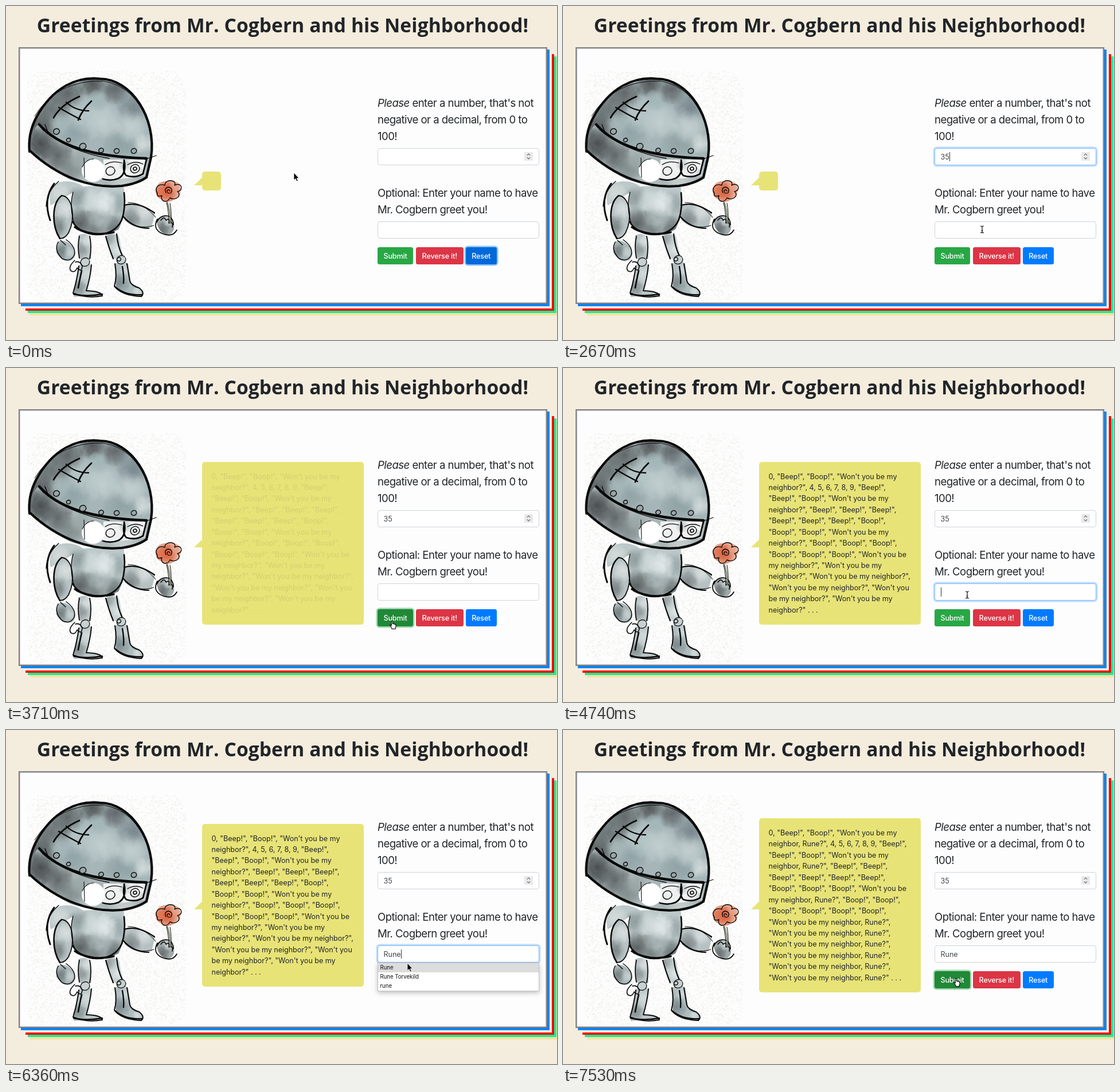
Recreate the animation shown at these times as an HTML page with a canvas. Size 961 by 583 pixels, loop 8000 ms.

```html
<!DOCTYPE html>
<html lang="en">
<head>
<meta charset="utf-8">
<title>Greetings</title>
<style>
html, body { margin: 0; width: 100%; height: 100%; overflow: hidden; background: #f4ecdd; }
#stage { position: relative; width: 961px; height: 583px; overflow: hidden; color: #212529;
  font: 12.6px/19.43px Inter, sans-serif; letter-spacing: -.04px; }
#stage > * { position: absolute; box-sizing: border-box; margin: 0; white-space: pre; }
canvas { left: 0; top: 0; width: 961px; height: 583px; }
h1 { left: 0; top: 13px; width: 965px; text-align: center; letter-spacing: .12px;
  font: 700 33.5px/40px "Open Sans", sans-serif; }
.label { left: 648px; font-size: 18.6px; line-height: 29.1px; letter-spacing: -.55px; }
.field { left: 648px; width: 281.5px; height: 30.5px; padding-left: 9.5px; line-height: 29px;
  background: #fff; border: 1px solid #ced4da; border-radius: 4px; color: #41474d; }
.field.focus { border-color: #80bdff; box-shadow: 0 0 0 2.5px rgba(0,123,255,.25); }
.field i { display: inline-block; width: 1px; height: 16px; background: #333; vertical-align: -3px; visibility: hidden; }
.field.focus i { visibility: visible; }
.button { top: 420.5px; height: 30.5px; line-height: 31px; border-radius: 3.5px; color: #fff;
  text-align: center; font-weight: 500; letter-spacing: -.18px; }
#submit { left: 648px; width: 62px; background: #28a745; }
#submit.dark { background: #218838; }
#submit.focus { box-shadow: 0 0 0 2.5px rgba(72,180,97,.5); }
#reverse { left: 715px; width: 82.5px; background: #dc3545; }
#reset { left: 801.5px; width: 54.5px; background: #007bff; }
#reset.focus { background: #0069d9; box-shadow: 0 0 0 2.5px rgba(38,143,255,.5); }
#bubble { left: 342px; background: #e8e377; border-radius: 5px; }
#tail { left: 328px; top: 299px; width: 14.5px; height: 14px; background: #e8e377;
  clip-path: polygon(0 100%, 100% 0, 100% 100%); }
#speech { left: 358.5px; }
#menu { left: 648px; width: 281.5px; background: #fff; border: 1px solid #c4c4c4;
  box-shadow: 0 3px 8px rgba(0,0,0,.25); font-size: 9.7px; line-height: 16.2px; letter-spacing: -.05px; color: #111; }
#menu div { padding-left: 3.5px; height: 16.2px; }
#menu .hot { background: #dcdcdc; }
#spin, #cursor { overflow: visible; }
#spin { left: 904px; top: 255px; }
#cursor { left: 0; top: 0; }
</style>
</head>
<body>
<div id="stage">
  <canvas id="art"></canvas>
  <h1>Greetings from Mr. Cogbern and his Neighborhood!</h1>
  <div id="tail"></div>
  <div id="bubble"></div>
  <div id="speech"></div>
  <div class="label" style="top:154.5px"><em>Please</em> enter a number, that's not
negative or a decimal, from 0 to
100!</div>
  <div class="field" id="num" style="top:247.5px"><span></span><i></i></div>
  <svg id="spin" width="15" height="15"><rect width="15" height="15" fill="#e9e9eb"/>
    <path d="M4.8 5.6L7.5 3L10.2 5.6M4.8 9.4L7.5 12L10.2 9.4" fill="none" stroke="#666" stroke-width="1.1"/></svg>
  <div class="label" style="top:311.5px">Optional: Enter your name to have
Mr. Cogbern greet you!</div>
  <div class="field" id="name" style="top:375.5px"><span></span><i></i></div>
  <div class="button" id="submit">Submit</div>
  <div class="button" id="reverse">Reverse it!</div>
  <div class="button" id="reset">Reset</div>
  <div id="menu"></div>
  <svg id="cursor" width="20" height="20"><path stroke-linejoin="round"/></svg>
</div>
<script>
const $ = id => document.getElementById(id);

// ---- static artwork ----
const art = $('art'), c = art.getContext('2d'), dpr = window.devicePixelRatio || 1;
art.width = 961 * dpr;
art.height = 583 * dpr;
c.scale(dpr, dpr);
c.lineCap = c.lineJoin = 'round';

let seed = 7;
const rnd = () => (seed = seed * 16807 % 2147483647) / 2147483647;

function box(x, y, w, h, color) {
  c.fillStyle = color;
  c.fillRect(x, y, w, h);
}

function panel() {
  const shades = [[20, '#f6e29c'], [16, '#14f09c'], [12, '#ff0000'], [8, '#f4ecdd'], [4, '#0a84f5']];
  shades.forEach(([d, color]) => box(22 + d, 72 + d, 922, 448, color));
  ['#5e5e62', '#b4b4b8', '#6b6b70', '#fdfdfd'].forEach((color, i) =>
    box(22 + i * .8, 72 + i * .8, 922 - i * 1.6, 448 - i * 1.6, color));
}

function blot(x, y, r, color) {
  const g = c.createRadialGradient(x, y, 0, x, y, r);
  g.addColorStop(0, color + 'e0');
  g.addColorStop(.5, color + '90');
  g.addColorStop(1, color + '00');
  c.globalAlpha = 1;
  c.fillStyle = g;
  c.fillRect(x - r, y - r, 2 * r, 2 * r);
}

// Watercolour fill: soft blots with small ragged patches around each
function wash(d, base, blots) {
  const p = new Path2D(d);
  c.save();
  c.fillStyle = base;
  c.fill(p);
  c.clip(p);
  for (const [x, y, r, color] of blots) {
    blot(x, y, r, color);
    for (let i = 0; i < 12; i++) {
      const a = rnd() * 6.28, q = r * (.2 + rnd() * .7);
      c.globalAlpha = .13;
      c.fillStyle = color;
      c.beginPath();
      for (let k = 0; k < 9; k++) {
        const s = r * (.12 + rnd() * .18), b = k * .7;
        c.lineTo(x + Math.cos(a) * q + Math.cos(b) * s, y + Math.sin(a) * q + Math.sin(b) * s * 1.4);
      }
      c.fill();
    }
  }
  c.restore();
}

function ink(d, w = 1.6, color = '#080808') {
  c.strokeStyle = color;
  c.lineWidth = w;
  c.stroke(new Path2D(d));
}

function ring(x, y, r, w = 1.4, fill) {
  c.beginPath();
  c.ellipse(x, y, r, r * .9, -.4, 0, 6.0);
  if (fill) { c.fillStyle = fill; c.fill(); }
  c.strokeStyle = '#111';
  c.lineWidth = w;
  c.stroke();
}

function paper() {
  c.save();
  c.beginPath();
  c.roundRect(37, 113, 277, 402, 28);
  c.clip();
  for (let i = 0; i < 8000; i++) box(37 + rnd() * 277, 113 + rnd() * 403, 1.8, 1.8, rnd() < .5 ? '#f0efeb' : '#f7f6f4');
  c.restore();
}

function legs() {
  wash('M126 400Q140 394 147 404L149 440Q138 452 127 438Z', '#bcc5c6', [[129, 426, 16, '#8b9495'], [143, 410, 12, '#dce2e2']]);
  wash('M128 452Q140 446 149 452L140 496Q165 496 168 504L118 508Q120 480 128 452Z', '#bac5c6', [[125, 492, 16, '#7d8788'], [143, 468, 14, '#d5dddd']]);
  wash('M174 402Q186 394 197 402L204 436Q194 448 186 438Z', '#c6d0d0', [[178, 406, 14, '#8e9798'], [196, 425, 12, '#dfe5e5']]);
  wash('M190 450Q204 442 213 450L218 484Q236 490 239 503Q214 510 192 494Z', '#b0bdbe', [[196, 484, 20, '#77858a'], [209, 460, 12, '#d3dbdb'], [229, 498, 9, '#d8dfdf']]);
  ink('M128 402Q124 420 128 440M146 402Q150 420 146 441', 1.8);
  ink('M127 454Q124 478 117 501Q140 511 168 506Q167 498 140 497Q147 474 149 452', 2);
  ink('M118 503Q140 508 168 503M132 462Q128 480 126 492', 2.6);
  ink('M174 402Q180 424 187 441M193 398Q195 420 203 436', 2.2);
  ink('M190 450Q194 472 189 489Q202 506 236 507Q243 500 232 492Q218 488 216 480L211 450', 2);
  ink('M190 490Q208 506 238 504M203 455Q206 472 205 484', 2.4);
  ring(138, 447, 8, 1.3, '#c8d0d0');
  ring(201, 443, 8, 1.3, '#c8d0d0');
  ring(197, 442, 3.5);
}

function torso() {
  wash('M86 310Q112 300 135 315L205 312Q212 360 196 390Q160 410 122 390Q110 350 116 326L78 348Q72 328 86 310Z', '#bcc8c9',
    [[126, 335, 22, '#8a9799'], [195, 345, 24, '#99a8aa'], [130, 380, 30, '#4e5455'], [190, 388, 26, '#626b6c'], [156, 394, 20, '#757d7e'],
     [165, 368, 24, '#9fadae'], [150, 338, 22, '#cfdada'], [172, 345, 24, '#e4eaea'], [92, 325, 20, '#d6dbda']]);
  wash('M97 331C116 334 121 372 108 396Q99 410 91 403C78 382 80 343 97 331Z', '#b7c2c3', [[88, 385, 20, '#747d7f'], [104, 354, 18, '#dbe1e1']]);
  wash('M90 412Q105 404 119 424Q124 437 114 444Q98 448 88 430Z', '#a8b6b7', [[96, 428, 14, '#707a7b'], [112, 430, 11, '#c9d2d2']]);
  wash('M206 348Q230 340 260 361L254 386Q220 392 204 369Z', '#b7c1c2', [[218, 372, 20, '#7b8385'], [242, 358, 18, '#dbe0e0']]);
  wash('M262 374Q274 360 291 374Q298 392 284 400Q266 398 262 374Z', '#a0a9aa', [[272, 390, 14, '#646b6c'], [285, 374, 12, '#ced4d4']]);
  ink('M84 310Q64 337 77 374', 3);
  ink('M92 306Q71 324 70 350M117 325Q110 350 119 380', 1.3);
  ink('M116 376C130 404 186 410 202 373Q209 352 206 326', 2.6);
  ink('M120 386Q150 404 188 395', 3.4);
  ink('M98 331C116 333 122 370 109 396Q101 408 93 405', 1.8);
  ink('M97 331C79 345 80 384 94 406', 2.6);
  ink('M91 412Q83 426 98 441Q112 448 119 435Q123 421 105 408M95 409L104 417', 1.5);
  ink('M120 444Q108 455 113 462Q120 467 124 457Q132 466 133 454Q129 444 121 447', 1.6);
  ink('M206 348Q229 340 259 361M204 367Q222 388 249 388', 2.2);
  ink('M213 343Q240 343 261 369M208 373Q230 392 258 383', 1);
  ink('M264 372Q255 389 272 397Q290 405 298 391M263 377Q270 363 284 367Q292 371 292 382', 1.7);
  ink('M270 374Q276 366 279 374Q286 369 284 379Q292 375 290 386', 1.6);
}

function flower() {
  ink('M281 342Q286 354 287 379', 2.4, '#85917b');
  ink('M280 343Q284 360 284 374M286 344Q289 360 288 379', 1);
  wash('M261 320Q264 305 280 306Q298 301 304 316Q307 333 294 337Q282 347 270 337Q261 334 261 320Z', '#eab9a5',
    [[280, 324, 22, '#d4532f'], [268, 324, 13, '#dd7655'], [298, 315, 12, '#e8a58c']]);
  ink('M264 327C258 318 266 309 277 313C277 301 299 303 294 313C306 306 311 322 299 324C307 329 298 341 286 335C280 346 268 340 272 331Q262 334 264 327', 1.4);
  ink('M279 326Q275 318 283 316Q292 318 288 326Q281 329 281 322Q284 319 286 323', 1.3);
}

function helmet() {
  wash('M41 236C46 190 85 130 160 127C215 126 258 190 255 250L246 299C215 317 150 318 110 302Q62 276 43 256Z', '#a6b6b8',
    [[60, 215, 34, '#4d5152'], [78, 180, 40, '#656c6e'], [108, 152, 32, '#5a5f60'], [150, 136, 26, '#4c5051'],
     [190, 146, 28, '#5b6163'], [222, 175, 30, '#77858a'], [118, 220, 30, '#8ea1a4'], [200, 240, 30, '#8ea0a3'],
     [135, 190, 34, '#b6c6c8'], [170, 200, 34, '#c3d0d1'], [160, 165, 20, '#a3b6b9'], [218, 212, 30, '#c4d0d1'],
     [240, 240, 18, '#d3dbdb'], [95, 205, 22, '#a7b9bb']]);
  // Lower rim below the brim
  wash('M41 234Q50 210 57 207C89 242 145 263 245 266L246 299C215 317 150 318 110 302Q62 276 43 256Z', '#a9b5b6',
    [[60, 240, 32, '#3c3f40'], [90, 262, 30, '#5b6162'], [112, 285, 26, '#7f898a'], [150, 310, 24, '#b4bebf'], [128, 270, 18, '#9ba6a7'], [205, 310, 30, '#c9d0d0']]);
  wash('M170 268L245 268L242 296Q210 302 168 304Z', '#eff1f1', [[208, 276, 12, '#c2caca'], [240, 292, 10, '#c5cccc']]);
  ink('M41 254Q38 224 52 196C82 140 125 123 164 127C218 127 263 195 253 264L245 299', 4.2);
  ink('M50 192Q90 128 170 131Q225 140 248 205', 1);
  ink('M41 252C92 300 150 319 202 314Q230 310 245 299', 4.2);
  ink('M58 207C89 242 145 263 245 266', 4.6);
  ink('M64 216Q110 254 180 266M242 268L262 261', 1.3);
  ink('M206 269Q211 293 196 301Q184 306 169 302M206 272Q203 290 210 296Q226 301 239 293L245 268', 2.8);
  ink('M173 277Q185 269 202 274M212 277Q226 269 239 276', 1.3);
  ring(182, 288, 8, 1.6);
  ring(225, 284, 8, 1.6);
  ring(225, 284, 3, 1.8);
  c.beginPath();
  c.arc(152, 287, 20, 0, 7);
  c.fillStyle = '#fff';
  c.fill();
  ink('M133 281Q140 267 153 267M136 265L137 299', 1.1);
  ink('M83 195Q96 172 128 158M126 199Q133 181 149 166', 2.8);
  ink('M105 168Q121 183 144 183M92 177Q112 189 130 198', 2.3);
  [[88, 219, 5.4], [109, 234, 3.6], [134, 245, 5.8], [166, 252, 4.3], [193, 253, 4.6], [223, 253, 4.8]]
    .forEach(([x, y, r]) => ring(x, y, r, 1.5, '#98a7a9'));
  ink('M68 207L73 220', 1.4);
}

[panel, paper, legs, torso, flower, helmet].forEach(draw => draw());

// ---- timeline ----
const LOOP = 8000;
const who = 'Rune';
const names = [who, 'Rune Torvekild', 'rune'];
const tens = ['3', '30', '33', '34', '35', '36'];

const plain = `0, "Beep!", "Boop!", "Won't you be my
neighbor?", 4, 5, 6, 7, 8, 9, "Beep!",
"Beep!", "Boop!", "Won't you be my
neighbor?", "Beep!", "Beep!", "Beep!",
"Beep!", "Beep!", "Beep!", "Boop!",
"Boop!", "Boop!", "Won't you be my
neighbor?", "Boop!", "Boop!", "Boop!",
"Boop!", "Boop!", "Boop!", "Won't you be
my neighbor?", "Won't you be my
neighbor?", "Won't you be my neighbor?",
"Won't you be my neighbor?", "Won't you
be my neighbor?", "Won't you be my
neighbor?" . . .`;

const ask = `"Won't you be my neighbor, ${who}?"`;
const named = `0, "Beep!", "Boop!", "Won't you be my
neighbor, ${who}?", 4, 5, 6, 7, 8, 9, "Beep!",
"Beep!", "Boop!", "Won't you be my
neighbor, ${who}?", "Beep!", "Beep!",
"Beep!", "Beep!", "Beep!", "Beep!",
"Boop!", "Boop!", "Boop!", "Won't you be
my neighbor, ${who}?", "Boop!", "Boop!",
"Boop!", "Boop!", "Boop!", "Boop!",
${Array(6).fill(ask).join(',\n')} . . .`;

const track = {
  num: [[0, ''], [1490, '3'], [1930, '35']],
  name: [[0, ''], [5190, 'R'], [5340, 'Ru'], [5485, 'Run'], [5630, who]],
  focus: [[0, 'reset'], [740, 'num'], [3260, 'submit'], [4740, 'name'], [7530, 'submit']],
  // time, top, rows, highlighted row
  menu: [[0], [1490, 278, tens], [1930, 278, ['35']], [2370], [5190, 406, names], [6360, 406, names, 0], [6650]],
  // time, top, width, height, text
  bubble: [[0, 289, 33, 33, ''], [3560, 163.5, 282, 284.5, plain], [7530, 154, 282, 304, named]],
  cursor: [[0, 502, 291, 'arrow'], [150, 560, 286, 'arrow'], [295, 636, 276, 'arrow'], [440, 718, 268, 'beam'],
    [740, 714, 268, 'beam'], [2225, 717, 292, 'arrow'], [2370, 721, 330, 'beam'], [2520, 727, 368, 'beam'],
    [2670, 731, 390, 'beam'], [2815, 718, 412, 'arrow'], [2965, 690, 436, 'hand'], [3115, 675, 448, 'hand'],
    [4150, 681, 446, 'hand'], [4440, 700, 440, 'hand'], [4740, 705, 396, 'beam'], [6360, 700, 407, 'arrow'],
    [6505, 701, 411, 'arrow'], [6650, 698, 427, 'hand'], [6795, 691, 436, 'hand'], [6940, 687, 440, 'hand']]
};
const at = (key, t) => track[key].filter(row => row[0] <= t).pop().slice(1);

const pointers = {
  arrow: ['M0 0V13L3 10.4L5.1 15L7.2 14L5.2 9.7H9Z', '#000', '#fff', .8],
  beam: ['M-3-6Q0-6 0-4Q0-6 3-6M0-4V4M-3 6Q0 6 0 4Q0 6 3 6M-1.5 2H1.5', 'none', '#111', 1.2],
  hand: ['M-2.8 2V-5.5q0-1.2 1.1-1.2t1.1 1.2V-1.5q1.8-.8 2 .5q1.6-.6 1.8.6q1.8-.4 1.8 1.4V3q0 2-1 3V7.5H-2V6L-5.2 1.5q-.6-1.5.9-1.3Z', '#fff', '#000', 1.1]
};

// Text fades in with a sine ease, in coarse steps
function fade(t) {
  const q = 3560 + Math.floor((t - 3560) / 147) * 147;
  return q >= 4400 ? 1 : .5 - .5 * Math.cos(Math.PI * Math.max(0, q - 3500) / 1000);
}

function px(el, props) {
  for (const k in props) el.style[k] = props[k] + 'px';
}

let shown = '';
function showMenu(top, rows, hot) {
  const key = [top, rows, hot].join('|');
  if (key === shown) return;
  shown = key;
  $('menu').innerHTML = rows ? rows.map((s, i) => `<div class="${i === hot ? 'hot' : ''}">${s}</div>`).join('') : '';
  if (rows) px($('menu'), { top: top - .5 });
}

function render(t) {
  const [focus] = at('focus', t), [x, y, kind] = at('cursor', t), [top, w, h, text] = at('bubble', t);
  for (const id of ['num', 'name']) $(id).firstChild.textContent = at(id, t)[0];
  for (const id of ['num', 'name', 'submit', 'reset']) $(id).classList.toggle('focus', id === focus);
  $('submit').classList.toggle('dark', focus === 'submit' || kind === 'hand');

  px($('bubble'), { top, width: w, height: h });
  px($('speech'), { top: top + 16 });
  $('speech').textContent = text;
  $('speech').style.opacity = fade(t);

  const menu = at('menu', t);
  $('menu').style.display = menu.length ? 'block' : 'none';
  showMenu(...menu);

  const [d, fill, stroke, width] = pointers[kind], p = $('cursor').firstChild;
  const attrs = { d, fill, stroke, 'stroke-width': width, transform: `translate(${x} ${y})` };
  for (const k in attrs) p.setAttribute(k, attrs[k]);
}

const start = performance.now();
function tick() {
  render((performance.now() - start) % LOOP);
  requestAnimationFrame(tick);
}
render(0);
requestAnimationFrame(tick);
</script>
</body>
</html>
```
